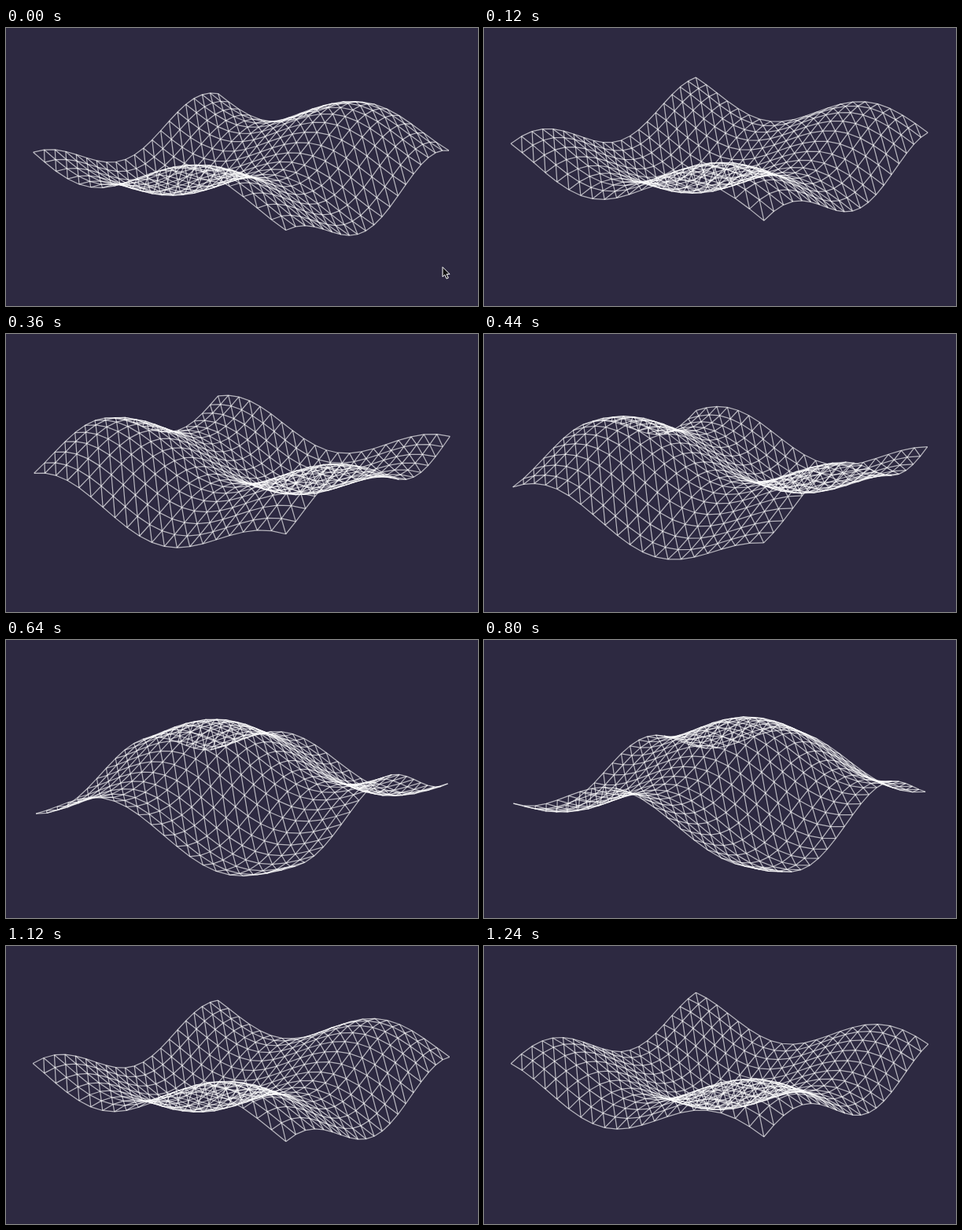
These frames come from a looping animation (600 by 354 pixels, 1280 ms). An HTML page with a canvas:

```html
<!DOCTYPE html>
<html lang="en">
<head>
<meta charset="utf-8">
<title>Wireframe wave</title>
<style>
  html, body { margin: 0; width: 100%; height: 100%; overflow: hidden; background: #2d2941; }
  canvas { display: block; width: 600px; height: 354px; }
</style>
</head>
<body>
<canvas id="stage" width="600" height="354"></canvas>
<script>
const ctx = document.getElementById('stage').getContext('2d');

const LOOP = 1280, STEP = 40;
const CELLS = 20;
const SIDE = 14;            // plane size in world units, wave height is 1
const SPEED = 0.006;        // radians per ms
const UNIT = Math.SQRT2 / SIDE;

// Camera: plane yaw, pitch, distance (in half diagonals) and screen centre
const cam = { yaw: 0.158, sin: 0.31, cos: 0.9507, dist: 6.07, zoom: 1618, x: 306, y: 171.2 };
const right = { x: Math.cos(cam.yaw), z: Math.sin(cam.yaw) };

// Cursor x for the first steps; it is gone afterwards
const cursorX = [554.5, 575.5];

function height(u, v, t) {
  const phase = SPEED * t, k = SIDE / 2;
  return UNIT * (Math.sin(phase - k * u) + Math.cos(phase - k * v));
}

// u runs from the left to the front corner, v from the left to the back corner
function project(u, v, t) {
  const along = u + v - 1, back = v - u;
  const x = along * right.x - back * right.z;
  const z = along * right.z + back * right.x;
  const h = height(u, v, t);
  const scale = cam.zoom / (cam.dist + z * cam.cos - h * cam.sin);
  return [cam.x + x * scale, cam.y - (h * cam.cos + z * cam.sin) * scale];
}

function polyline(points) {
  ctx.beginPath();
  for (const [x, y] of points) ctx.lineTo(x, y);
  ctx.stroke();
}

function drawMesh(t) {
  const grid = [];
  for (let i = 0; i <= CELLS; i++) {
    grid.push([]);
    for (let j = 0; j <= CELLS; j++) grid[i].push(project(i / CELLS, j / CELLS, t));
  }
  ctx.strokeStyle = 'rgba(255, 255, 255, 0.65)';
  ctx.lineWidth = 1.25;
  ctx.lineJoin = 'round';
  for (let i = 0; i <= CELLS; i++) {
    polyline(grid[i]);
    polyline(grid.map(row => row[i]));
  }
  for (let sum = 1; sum < 2 * CELLS; sum++) {
    const diagonal = [];
    for (let i = Math.max(0, sum - CELLS); i <= Math.min(CELLS, sum); i++) {
      diagonal.push(grid[i][sum - i]);
    }
    polyline(diagonal);
  }
}

const arrow = new Path2D('M.5 .8V13.2L3.3 10.6L5.5 15.6L7.8 14.6L5.6 9.8H9.5Z');

function drawCursor(x, y) {
  ctx.save();
  ctx.translate(x, y);
  ctx.fillStyle = '#111';
  ctx.strokeStyle = '#fff';
  ctx.lineWidth = 1;
  ctx.fill(arrow);
  ctx.stroke(arrow);
  ctx.restore();
}

function draw(step) {
  ctx.fillStyle = '#2d2941';
  ctx.fillRect(0, 0, 600, 354);
  drawMesh(step * STEP);
  if (step < cursorX.length) drawCursor(cursorX[step], 303.6);
}

const start = performance.now();
let shown = -1;

function tick() {
  const step = Math.floor(((performance.now() - start) % LOOP) / STEP);
  if (step !== shown) draw(shown = step);
  requestAnimationFrame(tick);
}
tick();
</script>
</body>
</html>
```
